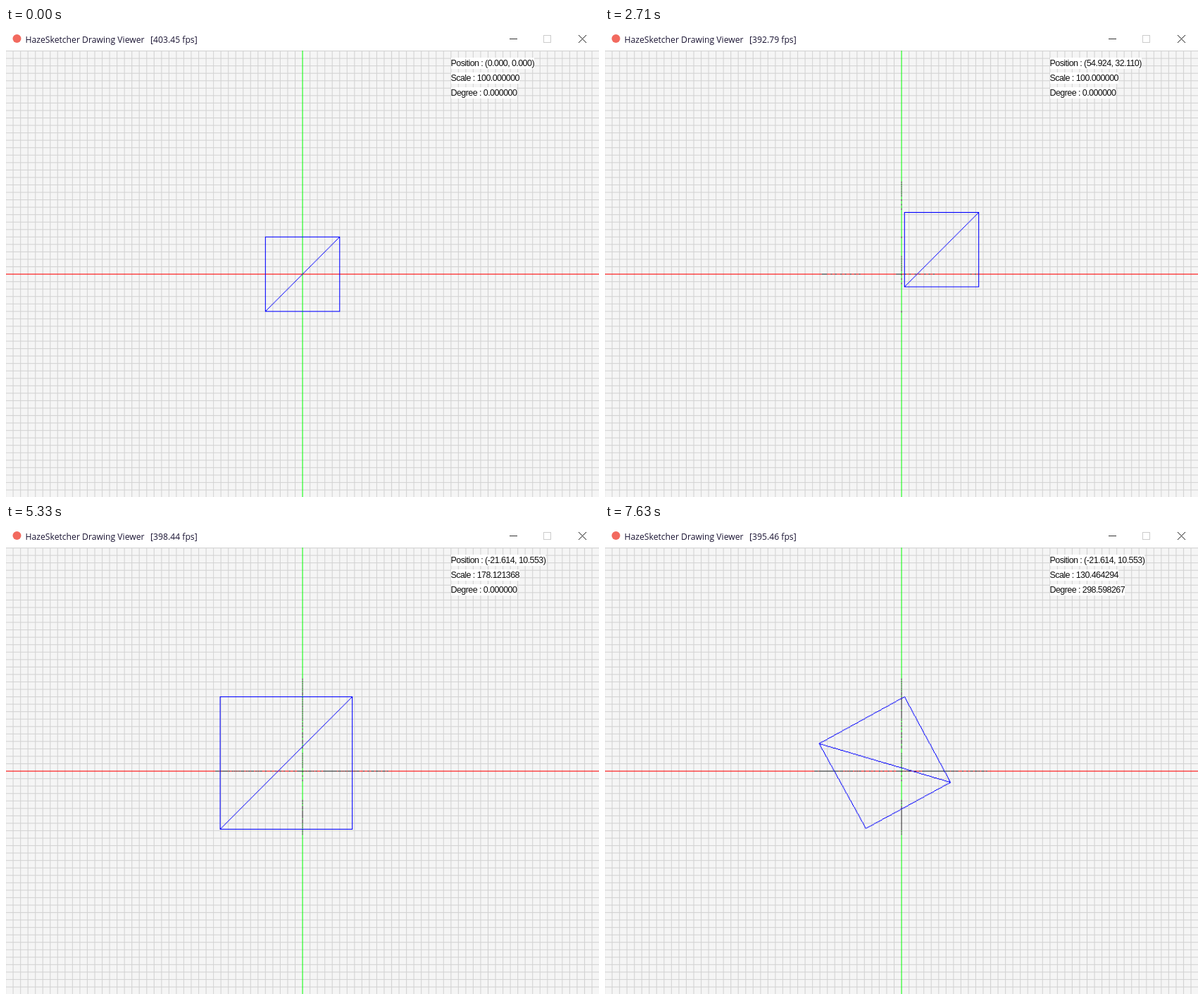
An HTML page with a canvas for the animation above (7760 ms loop, 842 by 665 pixels).

```html
<!DOCTYPE html>
<html lang="en">
<head>
<meta charset="utf-8">
<title>Transform viewer</title>
<style>
  html, body { margin: 0; width: 100%; height: 100%; overflow: hidden; background: #fff; }
  #stage { position: relative; width: 842px; height: 665px; overflow: hidden; background: #fff; }
  #view { position: absolute; left: -1px; top: 32px; width: 843px; height: 633px; }
  #bar { position: absolute; left: 0; top: 0; }
  #bar text { font: 12.2px "Open Sans", "Noto Sans", sans-serif; fill: #1a1433; }
  .hud {
    position: absolute; left: 631.5px; height: 16px; line-height: 16px;
    font-family: "Liberation Sans", Arial, sans-serif; font-size: 12.5px;
    letter-spacing: -0.57px; white-space: pre; color: #111; background: #fff;
  }
</style>
</head>
<body>
<div id="stage">
  <canvas id="view" width="800" height="600"></canvas>
  <svg id="bar" width="842" height="32" viewBox="0 0 842 32">
    <circle cx="15.5" cy="15" r="6" fill="#f26a5f"/>
    <text x="27.5" y="21">HazeSketcher Drawing Viewer</text>
    <text id="fps" x="205" y="21"></text>
    <path d="M715 15.5H726" stroke="#333" fill="none"/>
    <rect x="763.5" y="10.5" width="10" height="10" stroke="#ccc" fill="none"/>
    <path d="M813 10L824 21M824 10L813 21" stroke="#222" fill="none"/>
  </svg>
  <div class="hud" id="pos" style="top:42px"></div>
  <div class="hud" id="scale" style="top:63px"></div>
  <div class="hud" id="deg" style="top:84px"></div>
</div>
<script>
const LOOP = 7760, START = 200, END = 7630, STEPS = 108;
const STEP = (END - START) / (STEPS - 1);
const CX = 400, CY = 300;

// Key points: time, then values
const path = [
  [135, 0, 0], [750, -57, 0], [970, -57, 22], [1450, -47.334, 64.538],
  [1560, -38, 74], [2200, 13, 74], [2700, 54.924, 32.11], [2830, 65.6, 21.6],
  [3400, 12.6, -18.5], [3650, -9.814, -18.5], [3880, -9.814, 1.823], [4000, -21.614, 10.553]
];
const zoom = [[4205, 100], [5190, 190.5], [5340, 178.121368], [5848, 130.464294]];
const turn = [[5826, 0], [6380, 91.743599], [7630, 298.598267]];

const el = id => document.getElementById(id);
const ctx = el("view").getContext("2d");

function sample(keys, t, k = 1) {
  const next = keys.findIndex(key => t <= key[0]);
  if (next === 0) return keys[0][k];
  if (next < 0) return keys[keys.length - 1][k];
  const a = keys[next - 1], b = keys[next];
  return a[k] + (b[k] - a[k]) * (t - a[0]) / (b[0] - a[0]);
}

function stepAt(t) {
  return t < START ? 0 : Math.min(STEPS, 1 + Math.floor((t - START) / STEP + 0.2));
}

// Times are kept to the nearest 10 ms
function poseAt(step) {
  const t = step && Math.round((START + (step - 1) * STEP) / 10) * 10;
  return { x: sample(path, t), y: sample(path, t, 2), size: sample(zoom, t), deg: sample(turn, t) };
}

function frameRate(step) {
  const r = Math.abs(Math.sin(step * 12.9898)) * 437.585;
  return 403.45 - (r % 1) * 11;
}

// The four sides, then the diagonal
function edges(p) {
  const a = p.deg * Math.PI / 180, c = Math.cos(a), s = Math.sin(a), h = p.size / 2;
  const corner = (u, v) => [
    Math.floor(CX + p.x + h * (u * c - v * s)),
    Math.floor(CY - p.y - h * (u * s + v * c))
  ];
  const bl = corner(-1, -1), tl = corner(-1, 1), tr = corner(1, 1), br = corner(1, -1);
  return [[bl, tl], [tl, tr], [tr, br], [br, bl], [bl, tr]];
}

function pixelLine([a, b]) {
  const dx = b[0] - a[0], dy = b[1] - a[1];
  const n = Math.max(Math.abs(dx), Math.abs(dy), 1);
  for (let i = 0; i <= n; i++)
    ctx.fillRect(Math.round(a[0] + dx * i / n), Math.round(a[1] + dy * i / n), 1, 1);
}

// Dark trace left where a side has crossed an axis
function axisTrace([a, b]) {
  if ((a[1] - CY) * (b[1] - CY) < 0) {
    const x = a[0] + (b[0] - a[0]) * (CY - a[1]) / (b[1] - a[1]);
    ctx.fillRect(Math.round(x), CY, 2, 1);
  }
  if ((a[0] - CX) * (b[0] - CX) < 0) {
    const y = a[1] + (b[1] - a[1]) * (CX - a[0]) / (b[0] - a[0]);
    ctx.fillRect(CX, Math.round(y), 1, 2);
  }
}

function drawGrid() {
  ctx.fillStyle = "#f5f5f5";
  ctx.fillRect(0, 0, 800, 600);
  ctx.fillStyle = "#d3d3d3";
  for (let x = 0; x < 800; x += 10) ctx.fillRect(x, 0, 1, 600);
  for (let y = 0; y < 600; y += 10) ctx.fillRect(0, y, 800, 1);
  ctx.fillStyle = "#f00";
  ctx.fillRect(0, CY, 800, 1);
  ctx.fillStyle = "#0f0";
  ctx.fillRect(CX, 0, 1, 600);
}

function draw(step) {
  const p = poseAt(step);
  drawGrid();
  ctx.fillStyle = "#222";
  for (let i = 1; i < step; i++) edges(poseAt(i)).slice(0, 4).forEach(axisTrace);
  ctx.fillStyle = "#00f";
  edges(p).forEach(pixelLine);
  el("fps").textContent = `[${frameRate(step).toFixed(2)} fps]`;
  el("pos").textContent = `Position : (${p.x.toFixed(3)}, ${p.y.toFixed(3)})`;
  el("scale").textContent = `Scale : ${p.size.toFixed(6)}`;
  el("deg").textContent = `Degree : ${p.deg.toFixed(6)}`;
}

let shown = -1;
const begin = performance.now();
function tick() {
  const step = stepAt((performance.now() - begin) % LOOP);
  if (step !== shown) draw(shown = step);
  requestAnimationFrame(tick);
}
tick();
</script>
</body>
</html>
```
